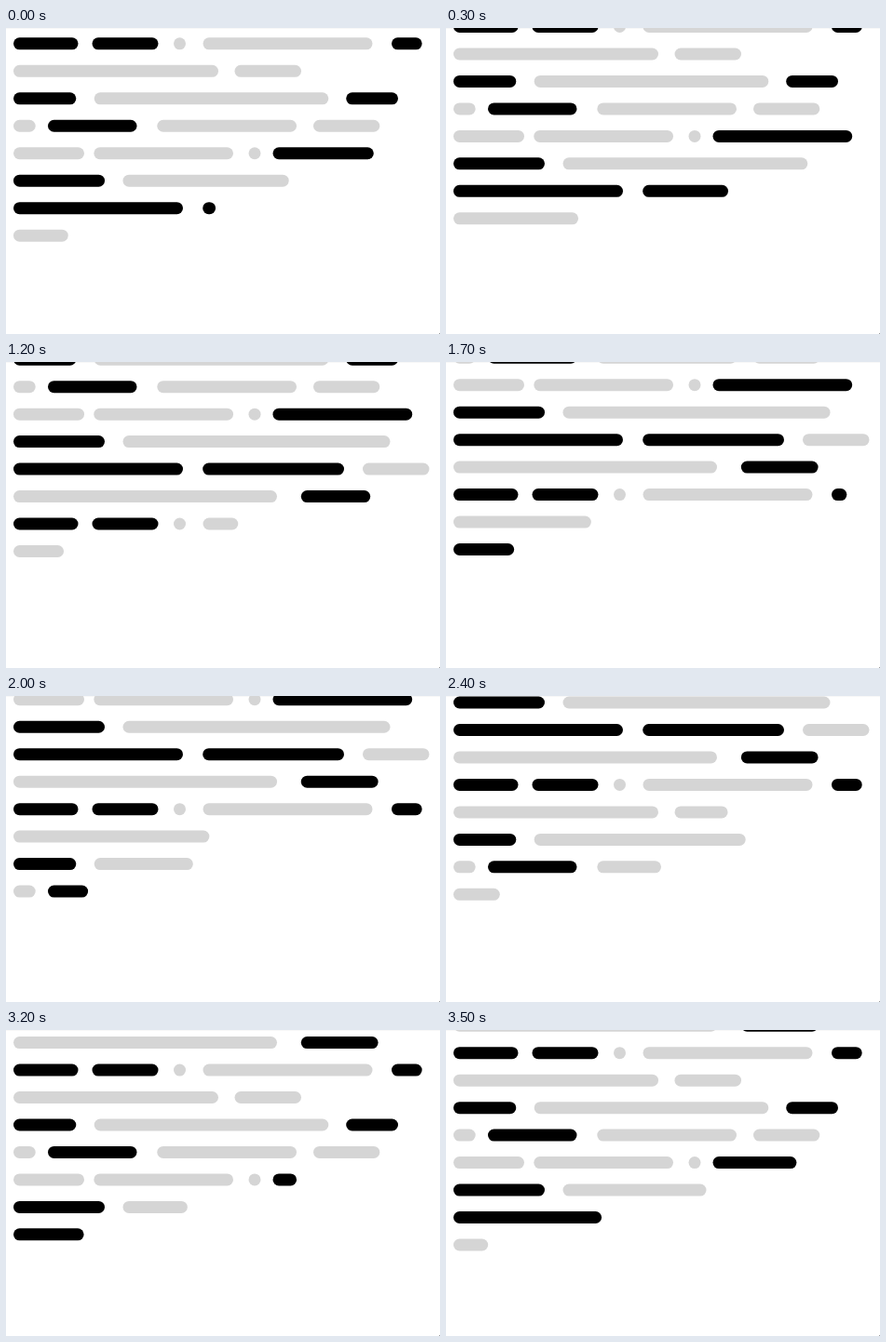
These frames come from a looping animation (466 px wide and 329 px high, 3600 ms). An HTML page with a canvas:

```html
<!DOCTYPE html>
<html lang="en">
<head>
<meta charset="utf-8">
<title>Scrolling code lines</title>
<style>
  html, body { margin: 0; width: 100%; height: 100%; overflow: hidden; background: #fff; }
  canvas { display: block; }
</style>
</head>
<body>
<canvas id="stage" width="466" height="329"></canvas>
<script>
const ctx = document.getElementById("stage").getContext("2d");

const LOOP = 3600;
const TICK = 100;
const STEP = 40;          // scroll and growth move on a 25 fps clock
const GROW_LOOP = 3560;   // growth repeats one step sooner than the scroll
const THICK = 13;
const LEFT = 8;
const TOP = 16.85;
const PITCH = 29.47;
const FIRST_START = 590;
const STAGGER = 400;
const TONES = { k: "#000", g: "#d5d5d5" };

// tones of the bars, time to type the row, then bar, gap, bar, gap, bar ...
const rows = [
  row("kkggk", 1200, 69.5, 15, 71, 16.5, 13, 18.5, 182, 20.5, 32.7),
  row("gg", 1525, 220, 17.5, 71.5),
  row("kgk", 1350, 67.3, 19.4, 251.6, 18.9, 55.8),
  row("gkgg", 1150, 23.7, 13.3, 95.5, 21.8, 149.7, 18, 71.3),
  row("gggk", 1550, 76, 10.3, 149.7, 16.5, 13, 13, 149.7),
  row("kg", 1330, 98, 19.5, 287),
  row("kkg", 1350, 182, 21.2, 151.8, 20, 71.5),
  row("gk", 1420, 283, 25.8, 82.8)
];
const SPAN = PITCH * rows.length;

// Longer bars take longer to type, but less than in proportion.
function row(tones, duration, ...sizes) {
  const effort = width => Math.max(0.01, width - THICK) ** 0.65;
  const widths = sizes.filter((_, i) => i % 2 === 0);
  const total = widths.reduce((sum, width) => sum + effort(width), 0);
  let x = LEFT, start = 0;
  return widths.map((width, i) => {
    const bar = { x, width, start, time: duration * effort(width) / total, color: TONES[tones[i]] };
    x += width + sizes[2 * i + 1];
    start += bar.time;
    return bar;
  });
}

function drawRow(bars, y, age) {
  for (const bar of bars) {
    const part = Math.min(1, (age - bar.start) / bar.time);
    if (part <= 0) return;
    const width = THICK + part * (bar.width - THICK);
    ctx.fillStyle = bar.color;
    ctx.beginPath();
    ctx.roundRect(bar.x, y - THICK / 2, width, THICK, THICK / 2);
    ctx.fill();
  }
}

function draw(ms) {
  const tick = Math.floor((ms % LOOP) / TICK) * TICK;
  const time = Math.floor(tick / STEP) * STEP;
  const scroll = SPAN * time / LOOP;

  ctx.fillStyle = "#fff";
  ctx.fillRect(0, 0, 466, 329);
  ctx.fillStyle = "#f8f8f8";
  ctx.fillRect(0, 0, 466, 1);
  ctx.fillStyle = "#999";
  ctx.fillRect(465, 328, 1, 1);

  rows.forEach((bars, i) => {
    const y = TOP + PITCH * i - scroll;
    const age = time - FIRST_START - STAGGER * i;
    drawRow(bars, y, age + GROW_LOOP);
    drawRow(bars, y + SPAN, age);
  });
}

const begin = performance.now();
function loop() {
  draw(performance.now() - begin);
  requestAnimationFrame(loop);
}
loop();
</script>
</body>
</html>
```
